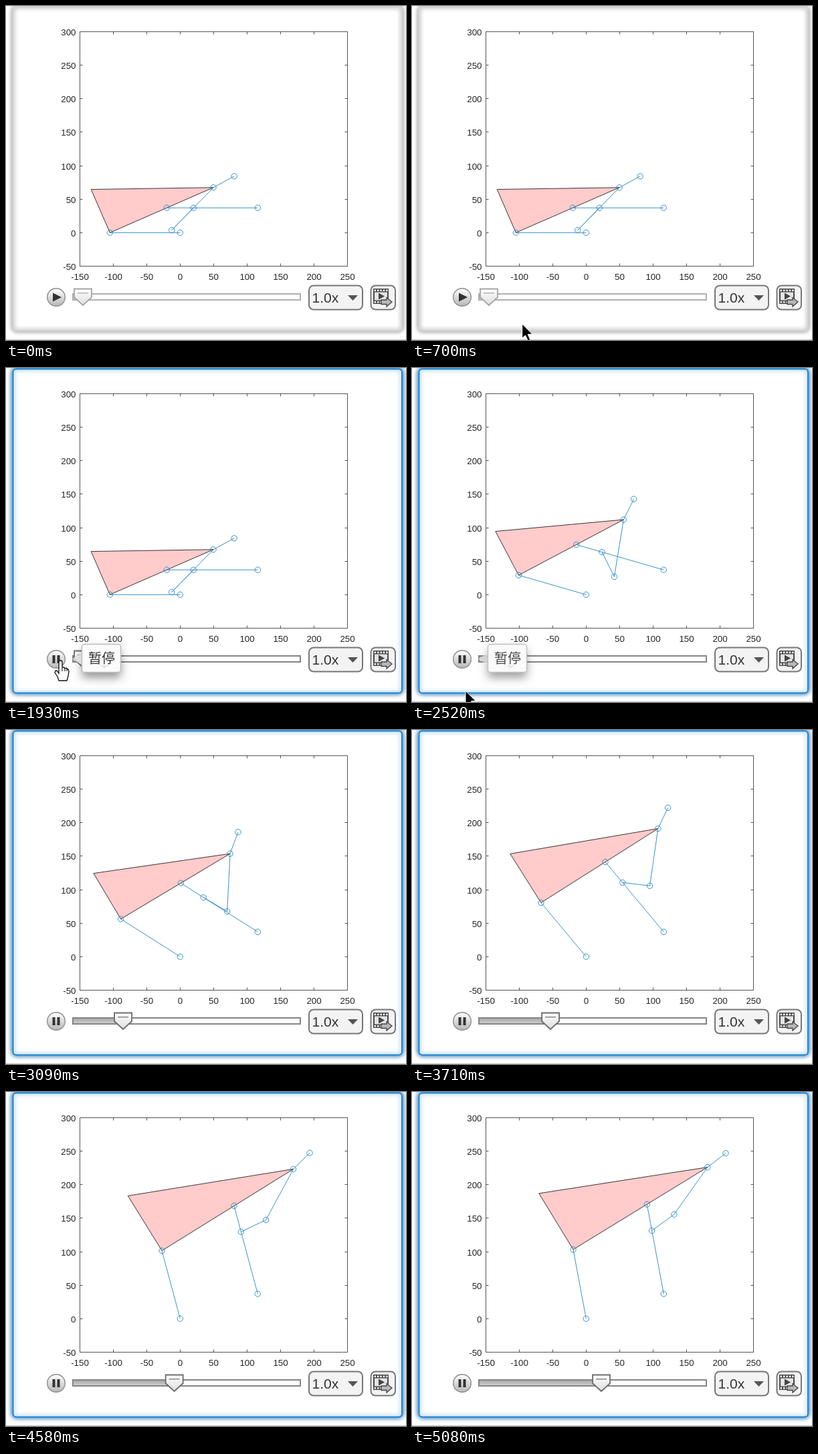
An HTML page with a canvas for the animation above (5.1 s loop, 598 by 500 pixels).

```html
<!DOCTYPE html>
<html lang="zh">
<head>
<meta charset="utf-8">
<title>Linkage player</title>
<style>
html, body { margin: 0; width: 100%; height: 100%; overflow: hidden; background: #fff; }
canvas { display: block; }
</style>
</head>
<body>
<canvas id="stage" width="598" height="500"></canvas>
<script>
const ctx = document.getElementById('stage').getContext('2d');
const LOOP = 5100;
const START = 1960, STOP_ANGLE = 79.4, DEG_PER_MS = 0.0286;
const SANS = '"Liberation Sans", Arial, sans-serif';
const CJK = '"Noto Sans CJK SC", "Noto Sans CJK", sans-serif';

// [time, value, ...] keys
const SLIDER = [[START, 115], [2520, 147], [3090, 175], [3710, 207], [4210, 232], [4720, 259], [5080, 283]];
const CURSOR = [[420, 222, 502], [930, 118, 455], [1240, 95, 441], [1360, 81, 438],
                [2300, 81, 438], [2520, 80, 483], [2580, 80, 502]];

const rad = d => d * Math.PI / 180;
const clamp01 = v => Math.max(0, Math.min(1, v));
const ramp = (t, a, b) => clamp01((t - a) / (b - a));

function keyed(keys, t) {
  let i = 0;
  while (i < keys.length - 2 && t > keys[i + 1][0]) i++;
  const [a, b] = [keys[i], keys[i + 1]];
  const k = ramp(t, a[0], b[0]);
  return a.slice(1).map((v, n) => v + (b[n + 1] - v) * k);
}

// vector helpers
const add = (p, q, k = 1) => [p[0] + q[0] * k, p[1] + q[1] * k];
const sub = (p, q) => add(p, q, -1);
const perp = p => [-p[1], p[0]];
const turn = (p, a) => add([p[0] * Math.cos(a), p[1] * Math.cos(a)], perp(p), Math.sin(a));
const polar = (r, a) => [r * Math.cos(a), r * Math.sin(a)];
const plot = ([x, y]) => [260.3 + x, 339.3 - y * 1.003];

function path(points, close) {
  ctx.beginPath();
  points.forEach(p => ctx.lineTo(...p));
  if (close) ctx.closePath();
}

function shape(points, fill, stroke, width = 1) {
  path(points, true);
  paint(fill, stroke, width);
}

function paint(fill, stroke, width = 1) {
  if (fill) { ctx.fillStyle = fill; ctx.fill(); }
  if (stroke) { ctx.strokeStyle = stroke; ctx.lineWidth = width; ctx.stroke(); }
}

function box(x, y, w, h, r, fill, stroke, width) {
  ctx.beginPath();
  ctx.roundRect(x, y, w, h, r);
  paint(fill, stroke, width);
}

function rect(x, y, w, h, color) {
  ctx.fillStyle = color;
  ctx.fillRect(x, y, w, h);
}

function text(str, x, y, size, align, color = '#262626', family = SANS) {
  ctx.font = `${size}px ${family}`;
  ctx.textAlign = align;
  ctx.textBaseline = 'alphabetic';
  ctx.fillStyle = color;
  ctx.fillText(str, x, y);
}

function shaded(y0, y1, top, bottom) {
  const g = ctx.createLinearGradient(0, y0, 0, y1);
  g.addColorStop(0, top);
  g.addColorStop(1, bottom);
  return g;
}

function withShadow(color, blur, dy, draw) {
  ctx.save();
  ctx.shadowColor = color;
  ctx.shadowBlur = blur;
  ctx.shadowOffsetY = dy;
  draw();
  ctx.restore();
}

function drawPanel(focus) {
  rect(0, 0, 598, 500, '#fff');
  rect(0, 499, 598, 1, '#c8c8c8');
  withShadow('#888', 6, 0, () => box(10.5, 1.5, 581.5, 484.5, 5, '#fff', '#d4d4d4', 2.5));
  ctx.globalAlpha = focus;
  if (focus) withShadow('#3d9be6', 7, 0, () => box(10.5, 1.5, 581.5, 485, 5, '#fff', '#1d83d4', 2));
  ctx.globalAlpha = 1;
}

function drawAxes() {
  const [left, top, right, bottom] = [110.5, 38.5, 510.5, 389.5];
  ctx.beginPath();
  ctx.rect(left, top, right - left, bottom - top);
  const line = (x, y, dx, dy) => { ctx.moveTo(x, y); ctx.lineTo(x + dx, y + dy); };
  for (let v = -150; v <= 250; v += 50) {
    const x = v + 260.5;
    line(x, top, 0, 4);
    line(x, bottom, 0, -4);
    text(v, x, 409.5, 13.33, 'center');
  }
  for (let v = -50; v <= 300; v += 50) {
    const y = Math.round(339.3 - v * 1.003 - 0.5) + 0.5;
    line(left, y, 4, 0);
    line(right, y, -4, 0);
    text(v, 104.5, y + 5, 13.33, 'right');
  }
  paint(null, '#555');
}

function drawLinkage(lift) {
  const angle = rad(180 - lift);
  const base = [0, 0], pivot = [116, 37];
  const crank = polar(105, angle);
  const knee = add(pivot, polar(136, angle));
  const mid = add(pivot, polar(96, angle));
  const side = sub(knee, crank);
  const tip = add(crank, side, 1.82);
  const back = add(crank, perp(side), 0.759);

  // elbow: where circles around tip and mid meet; on their line if they miss
  const link = sub(mid, tip), d = Math.hypot(...link);
  const along = (86.3 ** 2 - 41.1 ** 2 + d * d) / (2 * d);
  const height = Math.sqrt(Math.max(0, 86.3 ** 2 - along ** 2));
  const elbow = add(add(tip, link, along / d), perp(link), height / d);
  const end = add(tip, turn(sub(tip, elbow), rad(-17.2)), 0.398);

  shape([crank, tip, back].map(plot), '#ffcbcb', '#222', 0.9);
  [[base, crank], [pivot, knee], [mid, elbow, tip, end]].forEach(chain => {
    path(chain.map(plot));
    paint(null, '#2585c6', 0.9);
  });
  [base, crank, pivot, knee, mid, elbow, tip, end].forEach(p => {
    ctx.beginPath();
    ctx.arc(...plot(p), 4.2, 0, 7);
    paint(null, '#2585c6', 0.9);
  });
}

function drawPlayButton(playing) {
  ctx.beginPath();
  ctx.arc(75, 436, 13.3, 0, 7);
  paint(shaded(423, 450, '#fff', '#b4b4b4'), '#8c8c8c', 1.4);
  if (playing) {
    rect(69.5, 430, 4, 12, '#333');
    rect(76.5, 430, 4, 12, '#333');
  } else {
    shape([[70, 429.5], [83, 436], [70, 442.5]], '#303030');
  }
}

function drawSlider(x, playing) {
  const edge = playing ? '#858585' : '#b0b0b0';
  rect(99, 430, 342, 11, edge);
  rect(101, 432, 338, 7, '#fff');
  rect(101, 432, x - 101 - (playing ? 0 : 12), 7, shaded(432, 439, '#aaa', '#ccc'));
  shape([[x - 13, 423.5], [x + 13, 423.5], [x + 13, 436], [x, 448], [x - 13, 436]],
    shaded(423, 448, '#fff', '#dedede'), playing ? '#6c6c6c' : '#a5a5a5', 1.8);
  rect(x - 8, 429, 16, 1.5, playing ? '#888' : '#b5b5b5');
}

function drawSpeed() {
  box(453, 418.5, 80, 36, 7, '#f3f3f3', '#777', 2);
  text('1.0x', 457.5, 444, 21, 'left', '#333');
  shape([[511, 433], [526, 433], [518.5, 441]], '#555');
}

function drawExport() {
  box(545.5, 418.5, 36.5, 36, 7, '#f3f3f3', '#777', 2);
  rect(549, 423, 23, 23, '#484848');
  for (let i = 0; i < 5; i++) {
    rect(550.5 + i * 4.4, 424.5, 2.6, 2.6, '#f3f3f3');
    rect(550.5 + i * 4.4, 442, 2.6, 2.6, '#f3f3f3');
  }
  rect(551, 428.5, 19, 12, '#e4e4e4');
  shape([[557, 429.5], [566, 434.5], [557, 439.5]], '#444');
  shape([[561, 440], [569, 440], [569, 436.5], [577, 443], [569, 450], [569, 446.5], [561, 446.5]],
    '#b8b8b8', '#444', 1.3);
}

function drawTooltip(alpha) {
  if (!alpha) return;
  ctx.save();
  ctx.globalAlpha = alpha;
  withShadow('rgba(0,0,0,.42)', 14, 8, () => box(113.5, 413.5, 58, 42, 4, '#fbfbfb'));
  shape([[114, 426], [99, 435.5], [114, 445]], 'rgba(225,225,225,.85)');
  box(113.5, 413.5, 58, 42, 4, '#fbfbfb', '#bdbdbd', 1.4);
  shape([[140, 445], [154, 445], [147, 450]], '#e6e6e6');
  text('暂停', 143, 441.5, 20, 'center', '#333', CJK);
  ctx.restore();
}

function drawCursor(t) {
  if (t < CURSOR[0][0] || t > 2580) return;
  const [x, y] = keyed(CURSOR, t);
  const at = points => points.map(([a, b]) => [x + a, y + b]);
  if (t > 1150 && t < 2400) {
    shape(at([[-1, 0], [2, 0], [3, 2], [3, 10], [6, 10], [7, 12], [9, 11], [11, 13],
      [12, 13], [13, 16], [12, 23], [10, 30], [-2, 30], [-4, 24], [-8, 18], [-7, 15],
      [-5, 15], [-2, 19], [-2, 2]]), '#fff', '#111', 1.3);
    [3, 7, 10].forEach(a => { path(at([[a, 11], [a, 16]])); paint(null, '#111', 1.1); });
  } else {
    shape(at([[0, 0], [0, 21], [5, 17], [8.5, 25], [12, 23.5], [8.5, 15.5], [15, 15]]), '#000', '#fff', 1);
  }
}

function render(t) {
  const playing = t >= 1540;
  drawPanel(ramp(t, 1490, 1640));
  drawAxes();
  drawLinkage(Math.max(0, Math.min(STOP_ANGLE, (t - START) * DEG_PER_MS)));
  drawPlayButton(playing);
  drawSlider(keyed(SLIDER, t)[0], playing);
  drawSpeed();
  drawExport();
  drawTooltip(ramp(t, 1780, 1900) * (1 - ramp(t, 2500, 2720)));
  drawCursor(t);
}

const begin = performance.now();
function tick() {
  render((performance.now() - begin) % LOOP);
  requestAnimationFrame(tick);
}
tick();
</script>
</body>
</html>
```
